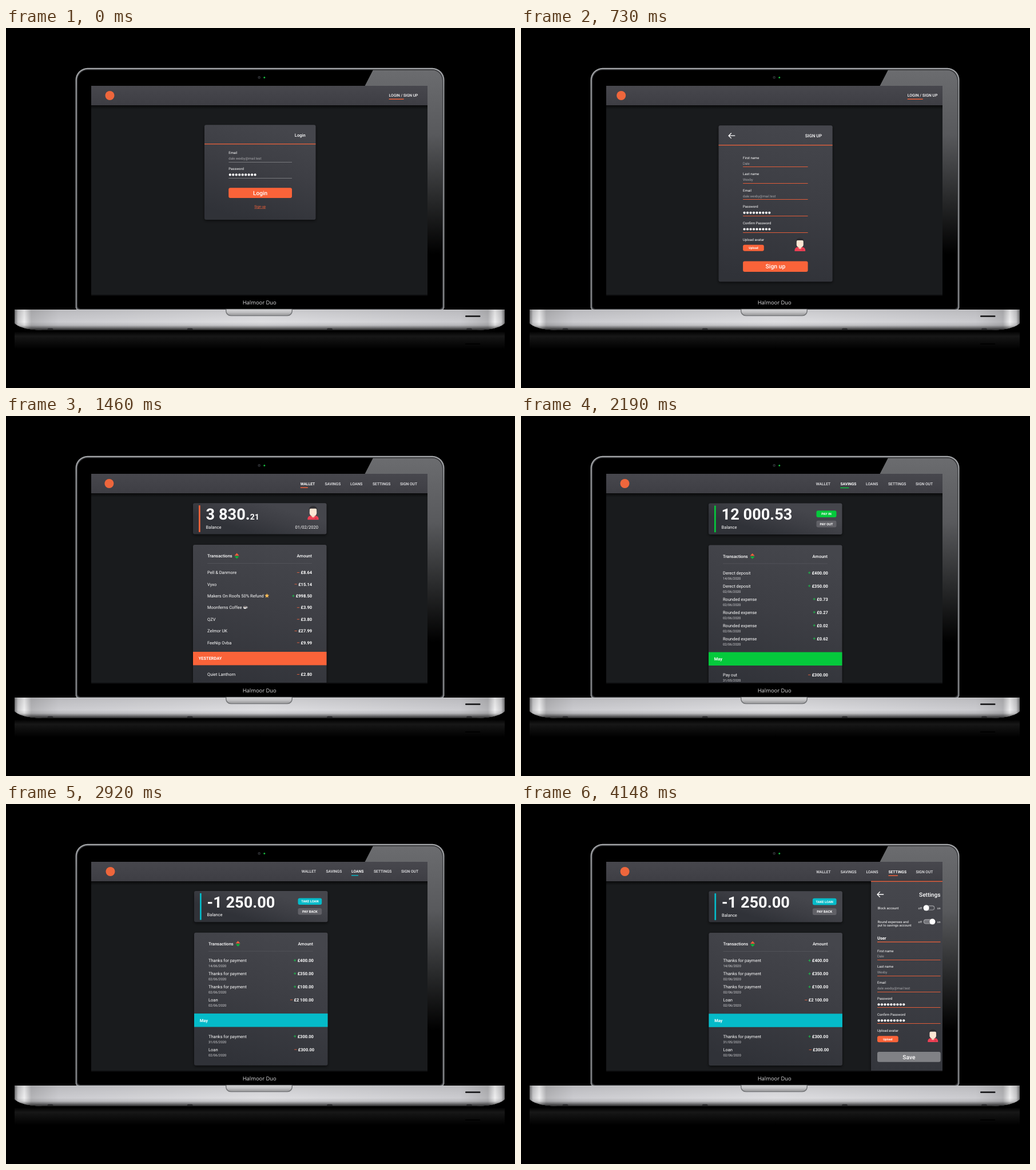
Recreate the animation shown at these times as an HTML page with a canvas. Size 890 by 629 pixels, loop 4.48 s.

```html
<!DOCTYPE html>
<html lang="en">
<head>
<meta charset="utf-8">
<title>Banking app on a laptop</title>
<style>
html, body { margin: 0; width: 100%; height: 100%; overflow: hidden; background: #000; }
canvas { display: block; width: 890px; height: 629px; }
</style>
</head>
<body>
<canvas id="stage" width="890" height="629"></canvas>
<script>
const ctx = document.getElementById('stage').getContext('2d');
const ORANGE = '#fa6339', GREEN = '#05c93c', CYAN = '#05bbc9', WHITE = '#fff';
const EMAIL = 'dale.wexby@mail.test';
const LOOP = 4480, STEP = 730;

// ---- helpers ----
function gradient(x0, y0, x1, y1, stops) {
  const g = ctx.createLinearGradient(x0, y0, x1, y1);
  stops.forEach(([at, color]) => g.addColorStop(at, color));
  return g;
}

function rect(x, y, w, h, fill) {
  ctx.fillStyle = fill;
  ctx.fillRect(x, y, w, h);
}

function box(x, y, w, h, r, fill) {
  ctx.fillStyle = fill;
  ctx.beginPath();
  ctx.roundRect(x, y, w, h, r);
  ctx.fill();
}

function circle(x, y, r, fill) {
  ctx.fillStyle = fill;
  ctx.beginPath();
  ctx.arc(x, y, r, 0, 2 * Math.PI);
  ctx.fill();
}

function polygon(points, fill) {
  ctx.fillStyle = fill;
  ctx.beginPath();
  points.forEach(([x, y]) => ctx.lineTo(x, y));
  ctx.closePath();
  ctx.fill();
}

function text(str, x, y, size, { weight = 400, color = WHITE, align = 'left', family = 'Roboto' } = {}) {
  ctx.font = `${weight} ${size}px "${family}", sans-serif`;
  ctx.textAlign = align;
  ctx.fillStyle = color;
  ctx.fillText(str, x, y);
  return ctx.measureText(str).width;
}

function withShadow(draw) {
  ctx.save();
  ctx.shadowColor = 'rgba(0,0,0,.6)';
  ctx.shadowBlur = 5;
  ctx.shadowOffsetY = 2;
  draw();
  ctx.restore();
}

// ---- interface parts ----
function card(x, y, w, h) {
  const middle = x + w / 2, slant = Math.min(w, h) * .15;
  const fill = gradient(middle + slant, y, middle - slant, y + h,
    [[0, '#45464c'], [.45, '#3d3e44'], [1, '#303238']]);
  withShadow(() => box(x, y, w, h, 3, fill));
}

function button(label, x, y, w, h, color, size, weight = 500) {
  box(x, y, w, h, 3, color);
  text(label, x + w / 2, y + h / 2 + size * .355, size, { weight, align: 'center' });
}

function backArrow(x, y) {
  ctx.strokeStyle = WHITE;
  ctx.lineWidth = 1.3;
  ctx.beginPath();
  ctx.moveTo(x + 12, y);
  ctx.lineTo(x + 1, y);
  ctx.moveTo(x + 5.5, y - 4.7);
  ctx.lineTo(x + .8, y);
  ctx.lineTo(x + 5.5, y + 4.7);
  ctx.stroke();
}

function avatar(x, y, scale = 1) {
  ctx.save();
  ctx.translate(x, y);
  ctx.scale(scale, scale);
  box(-6.8, -11.5, 13.6, 10.5, [6, 6, 2, 2], '#2e2e32');
  box(-9.3, 5, 18.6, 7, [5, 5, 0, 0], '#ee4054');
  box(-2.5, 3, 5, 5, 2, '#f2cbb0');
  box(-6, -7, 12, 12.5, [2, 2, 5, 5], '#fde6d3');
  rect(3, 9.2, 3, 1, '#b92c40');
  ctx.restore();
}

function passwordDots(x, y) {
  for (let i = 0; i < 9; i++) circle(x + 2.5 + i * 5.47, y, 2.1, WHITE);
}

function field(label, value, x, y, w, lineColor, valueDrop = 10) {
  text(label, x, y, 6);
  if (value) text(value, x, y + valueDrop, 6, { weight: 300, color: '#d5d5d8' });
  else passwordDots(x, y + valueDrop - 1.8);
  rect(x, Math.round(y + valueDrop + 3.3), w, 1, lineColor);
}

function personFields(x, y, w, pitch, drop) {
  [['First name', 'Dale'], ['Last name', 'Wexby'], ['Email', EMAIL], ['Password'], ['Confirm Password']]
    .forEach(([label, value], i) => field(label, value, x, y + i * pitch, w, '#e05c39', drop));
  const base = y + 5 * pitch;
  text('Upload avatar', x, base, 6);
  button('Upload', x, base + 7, 36.7, 11, ORANGE, 5.2, 700);
}

function navBar(logoX) {
  rect(149, 135, 588, 7, gradient(0, 135, 0, 142, [[0, 'rgba(0,0,0,.65)'], [1, 'rgba(0,0,0,0)']]));
  rect(149, 101, 588, 34, gradient(0, 101, 0, 135, [[0, '#47474d'], [1, '#3e3e44']]));
  circle(logoX, 118, 8, '#ee663c');
}

function guestNav(x, size, underline) {
  text('LOGIN / SIGN UP', x, 120.2, size, { weight: 500 });
  rect(x, 123.6, underline, 1.4, ORANGE);
}

function memberNav(active, accent) {
  const items = [['WALLET', 514.8, 13], ['SAVINGS', 557.4, 15], ['LOANS', 602, 12],
    ['SETTINGS', 641, 16.5], ['SIGN OUT', 689, 15]];
  items.forEach(([label, x, line]) => {
    const on = label === active;
    text(label, x, 120.6, 6.7, { weight: on ? 700 : 500, color: on ? WHITE : '#ececee' });
    if (on) rect(x, 124.4, line, 1.4, accent);
  });
}

function balanceCard(amount, accent) {
  card(327, 152.2, 233.5, 54.3);
  rect(337, 156.2, 2.7, 46.6, accent);
  text('Balance', 349.6, 196.7, 7.55);
  return text(amount, 349.6, 181, 27.2, { weight: 700 });
}

function transactionCard(height) {
  card(327, 225, 233.5, height);
  text('Transactions', 352, 247.3, 7.5, { weight: 500 });
  text('Amount', 535, 247.3, 7.5, { weight: 500, align: 'right' });
  polygon([[399.6, 243.9], [403.6, 239.6], [407.6, 243.9]], '#f0623c');
  polygon([[399.6, 245.1], [403.6, 249.4], [407.6, 245.1]], '#0fb53c');
  rect(352, 257, 183, 1, '#515258');
}

function star(x, y) {
  const points = Array.from({ length: 10 }, (_, i) => {
    const r = i % 2 ? 1.9 : 4.2, a = (i / 5 - .5) * Math.PI;
    return [x + r * Math.cos(a), y + r * Math.sin(a)];
  });
  polygon(points, '#fbbd55');
}

function cup(x, y) {
  box(x - 3, y - 2.2, 6, 4.6, [1, 1, 3, 3], '#e9e9ea');
  rect(x - 2.3, y - 1.6, 4.6, 1.2, '#5b4a43');
  ctx.strokeStyle = '#e9e9ea';
  ctx.lineWidth = .8;
  ctx.beginPath();
  ctx.arc(x + 3, y - .2, 1.3, -1.6, 1.6);
  ctx.stroke();
}

function entry(name, amount, y, { date, icon, right = 535 } = {}) {
  const width = text(name, 352, y, 7.5);
  if (icon) icon(352 + width + 5.5, y - 2.8);
  if (date) text(date, 352, y + 9.2, 5.9, { color: '#d2d2d5' });
  const sum = text('£' + amount.slice(1), right, y, 7.5, { weight: 700, align: 'right' });
  const gain = amount[0] === '+';
  const x = right - sum - 6.6;
  rect(x, y - 3.1, 4.2, .9, gain ? '#1cc04c' : '#e4633f');
  if (gain) rect(x + 1.65, y - 4.75, .9, 4.2, '#1cc04c');
}

function datedEntries(rows, y) {
  rows.forEach(([name, amount, date], i) =>
    entry(name, amount, y + i * 23, { date, right: 535.8 }));
}

function band(label, y, color) {
  rect(327, y, 233.5, 23.4, color);
  text(label, 336.8, y + 14.4, 7.4, { weight: 700 });
}

function toggle(y, on) {
  text('off', 694.5, y + 2, 5.1);
  text('on', 733.5, y + 2, 5.1, { align: 'right' });
  box(703.8, y - 4, 19.4, 8, 4, '#b9b9bc');
  box(704.6, y - 3.2, 17.8, 6.4, 3.2, on ? '#74757a' : '#4a4b51');
  circle(on ? 719.4 : 708.6, y, 5, WHITE);
}

function shifted(dx, dy, draw) {
  ctx.save();
  ctx.translate(dx, dy);
  draw();
  ctx.restore();
}

// ---- screens ----
function loginScreen() {
  navBar(181.5);
  guestNav(669.6, 6.7, 26);
  card(347, 169.3, 194.5, 165.7);
  rect(347, 202, 194.5, 1.3, '#e9603b');
  text('Login', 523.7, 189.7, 7.6, { weight: 500, align: 'right' });
  field('Email', EMAIL, 389.3, 220.3, 110.7, '#77787c');
  field('Password', '', 389.3, 248.2, 110.7, '#77787c');
  button('Login', 389.2, 279.3, 110.8, 17.7, ORANGE, 10.1);
  text('Sign up', 444.3, 314.2, 6, { color: ORANGE, align: 'center' });
  rect(434.4, 315, 19.8, .6, ORANGE);
}

function signUpScreen() {
  navBar(175.2);
  guestNav(675.7, 6.95, 27);
  card(345.5, 170.3, 199.2, 273);
  rect(345.5, 204, 199.2, 1.3, '#e9603b');
  backArrow(362.3, 188.2);
  text('SIGN UP', 526.2, 191, 7.7, { weight: 500, align: 'right' });
  personFields(388.1, 228.5, 113.5, 28.65, 10.2);
  avatar(487.8, 378);
  button('Sign up', 388.1, 407.6, 113.5, 18.3, ORANGE, 10.4);
}

function walletScreen() {
  navBar(180.4);
  memberNav('WALLET', ORANGE);
  const width = balanceCard('3 830.', ORANGE);
  text('21', 349.6 + width, 181, 14, { weight: 700 });
  text('01/02/2020', 546, 196.8, 7.6, { align: 'right' });
  avatar(537, 169, 1.03);
  transactionCard(260);
  [['Pell & Danmore', '-8.64'], ['Vyxo', '-15.14'],
    ['Makers On Roofs 50% Refund', '+998.50', star], ['Moonferns Coffee', '-3.90', cup],
    ['QZV', '-3.80'], ['Zelmor UK', '-27.99'], ['FeeNip Ovba', '-9.99']]
    .forEach(([name, amount, icon], i) => entry(name, amount, 276.1 + i * 20.43, { icon }));
  band('YESTERDAY', 412, ORANGE);
  entry('Quiet Lanthorn', '-2.80', 454.2);
}

function savingsScreen() {
  navBar(181.5);
  shifted(1, .4, () => {
    memberNav('SAVINGS', GREEN);
    balanceCard('12 000.53', GREEN);
    button('PAY IN', 515.5, 164.8, 35, 11.7, GREEN, 5.75, 700);
    button('PAY OUT', 515.5, 182.3, 35, 11.7, '#616167', 5.75, 700);
    transactionCard(260);
    const rounded = ['+0.73', '+0.27', '+0.02', '+0.62'].map(sum => ['Rounded expense', sum, '02/06/2020']);
    datedEntries([['Derect deposit', '+400.00', '14/06/2020'],
      ['Derect deposit', '+350.00', '02/06/2020'], ...rounded], 276.1);
    band('May', 412.2, GREEN);
    datedEntries([['Pay out', '-300.00', '31/05/2020']], 454.5);
  });
}

function loanContent(active, accent) {
  memberNav(active, accent);
  balanceCard('-1 250.00', CYAN);
  button('TAKE LOAN', 508.5, 164.7, 41.7, 11.7, CYAN, 5.8, 700);
  button('PAY BACK', 508.5, 182.2, 41.7, 11.7, '#616167', 5.8, 700);
  transactionCard(232);
  const thanks = 'Thanks for payment';
  datedEntries([[thanks, '+400.00', '14/06/2020'], [thanks, '+350.00', '02/06/2020'],
    [thanks, '+100.00', '02/06/2020'], ['Loan', '-2 100.00', '02/06/2020']], 276.1);
  band('May', 366.4, CYAN);
  datedEntries([[thanks, '+300.00', '31/05/2020']], 408.8);
  entry('Loan', '-300.00', 432, { date: '02/06/2020', right: 537 });
}

function loansScreen() {
  navBar(182.5);
  shifted(2, -.3, () => loanContent('LOANS', CYAN));
}

function settingsScreen() {
  navBar(181.6);
  shifted(1.4, 0, () => loanContent('SETTINGS', ORANGE));
  withShadow(() => rect(612, 135, 125, 331,
    gradient(0, 135, 0, 466, [[0, '#46474d'], [.5, '#3d3e44'], [1, '#34363c']])));
  rect(612, 134.5, 125, 1.4, '#e9603b');
  backArrow(622.2, 158);
  text('Settings', 733.4, 161.5, 10.1, { weight: 500, align: 'right' });
  text('Block account', 623.4, 183.6, 5.9);
  toggle(181.6, false);
  text('Round expenses and', 623.4, 207.6, 5.9);
  text('put to savings account', 623.4, 214.2, 5.9);
  toggle(205.6, true);
  text('User', 623, 237, 7.5, { weight: 700 });
  rect(623, 240.4, 110.5, 1.3, '#e9603b');
  personFields(623, 258.5, 110.5, 27.95, 9.8);
  avatar(720.2, 404.5, .96);
  button('Save', 623, 433, 110.7, 17.8, '#808185', 10.2);
}

// ---- laptop ----
function lid() {
  box(121.5, 69.8, 645, 423.2, [21, 21, 5, 5],
    gradient(0, 70, 0, 492, [[0, '#a3a5a8'], [.1, '#8f9194'], [1, '#85878a']]));
  box(123.8, 72, 640.4, 420, [19, 19, 5, 5], '#37383b');
  ctx.save();
  ctx.beginPath();
  ctx.roundRect(125, 73.5, 638, 417, [18, 18, 5, 5]);
  ctx.fillStyle = '#000';
  ctx.fill();
  ctx.clip();
  polygon([[642, 73], [764, 73], [764, 400], [737, 400], [737, 101], [627.5, 101]],
    gradient(0, 74, 0, 395, [[0, '#6b6c6f'], [.35, '#58595c'], [.7, '#28292a'], [1, '#000']]));
  ctx.restore();
  circle(442.7, 86.4, 2.3, '#303236');
  circle(442.7, 86.4, 1, '#0b0c10');
  circle(451.8, 86.4, 1.5, '#16b63d');
  rect(149, 466, 588, 2, '#0b0b0c');
  text('Halmoor Duo', 443.2, 483.4, 9.4, { color: '#dcdcde', align: 'center', family: 'Open Sans' });
}

function basePath() {
  ctx.beginPath();
  ctx.moveTo(15, 492);
  ctx.lineTo(872, 492);
  ctx.lineTo(872, 516);
  ctx.bezierCurveTo(865, 523, 848, 528, 817, 528);
  ctx.lineTo(70, 528);
  ctx.bezierCurveTo(39, 528, 22, 523, 15, 516);
  ctx.closePath();
}

function base() {
  rect(15, 531, 857, 30, gradient(0, 531, 0, 561,
    [[0, '#030303'], [.25, '#171717'], [.6, '#0c0c0c'], [1, '#000']]));
  rect(803, 551, 26, 2, '#000');
  basePath();
  ctx.fillStyle = gradient(15, 0, 872, 0, [
    [0, '#6e6e70'], [.007, '#c8c8ca'], [.02, '#f0f0f1'], [.034, '#b4b4b7'], [.09, '#cbcbcf'],
    [.5, '#dedee1'], [.91, '#cbcbcf'], [.966, '#b4b4b7'], [.98, '#f0f0f1'], [.993, '#c8c8ca'], [1, '#6e6e70']]);
  ctx.fill();
  ctx.fillStyle = gradient(0, 492, 0, 528, [
    [0, 'rgba(255,255,255,.3)'], [.06, 'rgba(0,0,0,.08)'], [.6, 'rgba(0,0,0,0)'],
    [.76, 'rgba(0,0,0,.1)'], [.87, 'rgba(0,0,0,.42)'], [1, 'rgba(0,0,0,.82)']]);
  ctx.fill();
  box(384, 491.5, 117, 11.8, [0, 0, 9, 9], '#737477');
  box(385.4, 491.5, 114.2, 10.4, [0, 0, 8, 8],
    gradient(0, 491, 0, 502, [[0, '#d4d4d6'], [.5, '#c2c2c4'], [1, '#98989a']]));
  box(803, 502.3, 26.5, 2.6, 1.2, '#1d1d1f');
  [77.5, 321.7, 566, 810].forEach(x => box(x - 5, 524.8, 10, 2.6, [3, 3, 1, 1], '#262628'));
}

const screens = [loginScreen, signUpScreen, walletScreen, savingsScreen, loansScreen, settingsScreen];

function draw(time) {
  ctx.textRendering = 'geometricPrecision';
  rect(0, 0, 890, 629, '#000');
  lid();
  base();
  ctx.save();
  ctx.beginPath();
  ctx.rect(149, 101, 588, 365);
  ctx.clip();
  rect(149, 101, 588, 365, '#191b1d');
  screens[Math.min(Math.floor(time / STEP), screens.length - 1)]();
  ctx.restore();
}

const start = performance.now();
function tick() {
  draw((performance.now() - start) % LOOP);
  requestAnimationFrame(tick);
}
tick();
</script>
</body>
</html>
```
